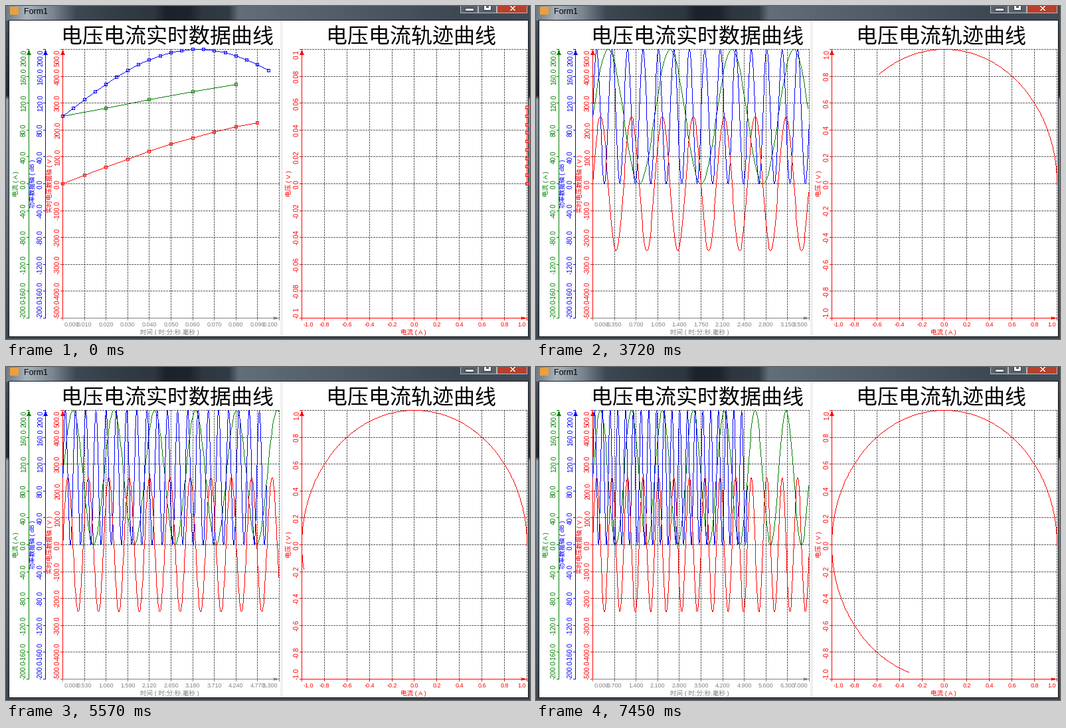
Write a matplotlib script that moves like this. It is 789x503 px and loops after 8000 ms.

```python
import matplotlib.pyplot as plt
import numpy as np
from matplotlib.animation import FuncAnimation
from matplotlib.colors import to_rgb

W, H, DPI = 789, 503, 100
PX = 72 / DPI
INTERVAL, LOOP = 40, 8000
TOP, BOTTOM = 65, 471
MID, HALF = (TOP + BOTTOM) / 2, (BOTTOM - TOP) / 2
L0, L1 = 85, 411
R0, R1 = 445, 784
GREEN, BLUE, RED, GRAY, GRID = "#008000", "#0000ff", "#ff0000", "#808080", "#606060"
MAX_MARKED = 150
MAX_POINTS = 1000

# Moments (ms) when the chart refreshes, and the time span (s) it then covers.
REFRESH = [0, 630, 1240, 1850, 2460, 3090, 3720, 4330, 4950, 5570, 6190, 6800, 7450]
SPANS = [0.1, 0.7, 1.2, 1.8, 2.4, 3.0, 3.5, 4.1, 4.7, 5.3, 5.8, 6.4, 7.0]

# sample step (s), period (s), offset relative to half the axis, colour
WAVES = [(0.02, 1.0, 0.5, GREEN), (0.005, 0.25, 0.5, BLUE), (0.01, 0.5, 0.0, RED)]

plt.rcParams["font.family"] = ["Liberation Sans", "Noto Sans CJK JP"]
plt.rcParams["toolbar"] = "None"
fig = plt.figure(figsize=(W / DPI, H / DPI), dpi=DPI)
ax = fig.add_axes([0, 0, 1, 1])
ax.axis("off")
base = np.full((H, W, 3), 255, np.uint8)


def rgb(color):
    return np.round(255 * np.array(to_rgb(color))).astype(np.uint8)


def box(x, y, w, h, color, edge=None):
    if edge:
        box(x - 1, y - 1, w + 2, h + 2, edge)
    base[max(y, 0):y + h, x:x + w] = rgb(color)


def pen(canvas, xs, ys, color, on=1, period=1):
    """Draw a hard-edged one pixel polyline, optionally dashed."""
    xs, ys = np.round(xs), np.round(ys)
    steps = np.maximum(abs(np.diff(xs)), abs(np.diff(ys)))
    length = np.concatenate([[0], np.cumsum(steps)])
    s = np.arange(length[-1] + 1)
    s = s[s % period < on]
    px = np.round(np.interp(s, length, xs)).astype(int)
    py = np.round(np.interp(s, length, ys)).astype(int)
    canvas[py, px] = rgb(color)


def curve(canvas, xs, ys, color):
    """Draw a polyline, with hollow square symbols while points are few."""
    pen(canvas, xs, ys, color)
    if len(xs) <= MAX_MARKED:
        for x, y in zip(np.round(xs), np.round(ys)):
            pen(canvas, x + np.array([-2, 2, 2, -2, -2]),
                y + np.array([-2, -2, 2, 2, -2]), color)


def label(x, y, text, color, ha="center", turn=0, size=9.0):
    return ax.text(x, y, text, color=color, fontsize=size * PX, ha=ha, va="baseline",
                   rotation=turn, rotation_mode="anchor")


def blend(pos, stops):
    at, colors = zip(*stops)
    return np.stack([np.interp(pos, at, c) for c in zip(*colors)], axis=-1)


def draw_window():
    sides = blend(np.arange(H), [(22, (70, 80, 90)), (135, (34, 41, 48)),
                                 (141, (140, 153, 165)), (502, (58, 69, 80))])
    base[:] = sides[:, None]
    base[:22] = blend(np.arange(W), [
        (0, (110, 122, 132)), (30, (168, 178, 187)), (70, (122, 133, 143)),
        (105, (62, 72, 82)), (180, (50, 59, 68)), (222, (46, 55, 64)),
        (240, (28, 34, 41)), (275, (30, 36, 43)), (295, (46, 54, 62)),
        (335, (50, 59, 68)), (350, (98, 110, 121)), (680, (62, 72, 82)),
        (788, (66, 76, 86))])
    box(0, 500, W, 3, "#3c4650")
    box(5, 22, 781, 477, "#f0f0f0", edge="#101418")
    box(5, 22, 408, 477, "white")
    box(417, 22, 368, 477, "white")

    box(6, 1, 13, 12, "#e8a040")
    label(26.5, 11, "Form1", "black", "left", size=12.5)
    for x, w, color in ((685, 25, "#59626b"), (712, 26, "#59626b"), (740, 44, "#b8402c")):
        box(x, 0, w, 10, color, edge="#b4bac0")
    box(692, 4, 12, 3, "white", edge="#303840")
    box(720, 0, 10, 6, "white", edge="#303840")
    box(723, 0, 4, 3, "#59626b")
    for x in (759, 760):
        pen(base, [x, x + 6], [0, 6], "white")
        pen(base, [x + 6, x], [0, 6], "white")


def draw_grid(x0, x1):
    for f in np.linspace(0, 1, 11):
        x, y = x0 + f * (x1 - x0), TOP + f * (BOTTOM - TOP)
        if f > 0:
            pen(base, [x, x], [TOP, BOTTOM], GRID, 3, 4)
        if f < 1:
            pen(base, [x0, x1], [y, y], GRID, 3, 4)


def end_align(j):
    return "left" if j == 0 else "right" if j == 10 else "center"


def y_axis(x, color, title):
    """Draw a vertical axis and return its tick labels, lowest first."""
    pen(base, [x, x], [TOP, BOTTOM], color)
    for d in range(9):
        half = d * 3 // 8
        pen(base, [x - half, x + half], [TOP + d] * 2, color)
    label(x - 16.5, MID, title, color, turn=90, size=9.5)
    texts = []
    for j in range(11):
        y = BOTTOM - j * (BOTTOM - TOP) / 10
        pen(base, [x - 3, x], [y, y], color)
        texts.append(label(x - 4.5, min(max(y, TOP + 0.5), BOTTOM), "", color,
                           end_align(j), 90, 10))
    return texts


def x_axis(x0, x1, color, title):
    """Draw a horizontal axis and return its tick labels, left first."""
    pen(base, [x0, x1], [BOTTOM, BOTTOM], color)
    for d in range(9):
        half = d * 2 // 8
        pen(base, [x1 - d] * 2, [BOTTOM - half, BOTTOM + half], color)
    label((x0 + x1) / 2 - 2, 495.5, title, color, size=9.5)
    texts = []
    for j in range(11):
        x = x0 + j * (x1 - x0) / 10
        pen(base, [x, x], [BOTTOM, BOTTOM + 3], color)
        texts.append(label(min(max(x, x0 + 2), x1 - 2), 483.5, "", color, end_align(j)))
    return texts


def fill(texts, low, high, form):
    for text, value in zip(texts, np.linspace(low, high, 11)):
        text.set_text(form(value))


def one_decimal(v):
    return f"{round(v, 6) + 0.0:.1f}"


def short_decimal(v):
    s = f"{round(v, 6) + 0.0:.2f}"
    return s[:-1] if s.endswith("0") else s


draw_window()
draw_grid(L0, L1)
draw_grid(R0, R1)
label(243, 55, "电压电流实时数据曲线", "black", size=32)
label(610, 55, "电压电流轨迹曲线", "black", size=32)

fill(y_axis(34, GREEN, "电流 ( A )"), -200, 200, one_decimal)
fill(y_axis(59, BLUE, "功率数据轴 ( dB )"), -200, 200, one_decimal)
fill(y_axis(L0, RED, "实时电压数据轴 ( V )"), -500, 500, one_decimal)
time_labels = x_axis(L0, L1, GRAY, "时间 ( 时:分:秒.毫秒 )")
orbit_labels = y_axis(R0, RED, "电压 ( V )")
fill(x_axis(R0, R1, RED, "电流 ( A )"), -1, 1, one_decimal)

picture = ax.imshow(base, aspect="auto", interpolation="nearest")


def update(i):
    now = i * INTERVAL + INTERVAL - 1
    span = SPANS[np.searchsorted(REFRESH, now, side="right") - 1]
    canvas = base.copy()

    for dt, period, offset, color in WAVES:
        t = dt * np.arange(min(round(span / dt), MAX_POINTS))
        value = offset + 0.5 * np.sin(2 * np.pi * t / period)
        curve(canvas, L0 + t / span * (L1 - L0), MID - value * HALF, color)

    angle = 2 * np.pi * np.arange(round(span / 0.01)) / 1000
    height = np.sin(angle)
    limit = 0.1 if height.max() <= 0.1 else 1.0
    curve(canvas, (R0 + R1) / 2 + np.cos(angle) * (R1 - R0) / 2,
          MID - height / limit * HALF, RED)

    picture.set_data(canvas)
    fill(time_labels, 0, span, lambda v: f"{v:.3f}")
    fill(orbit_labels, -limit, limit, short_decimal)
    return [picture, *time_labels, *orbit_labels]


anim = FuncAnimation(fig, update, frames=LOOP // INTERVAL, interval=INTERVAL,
                     repeat=True, repeat_delay=0, blit=False)
plt.show()
```
